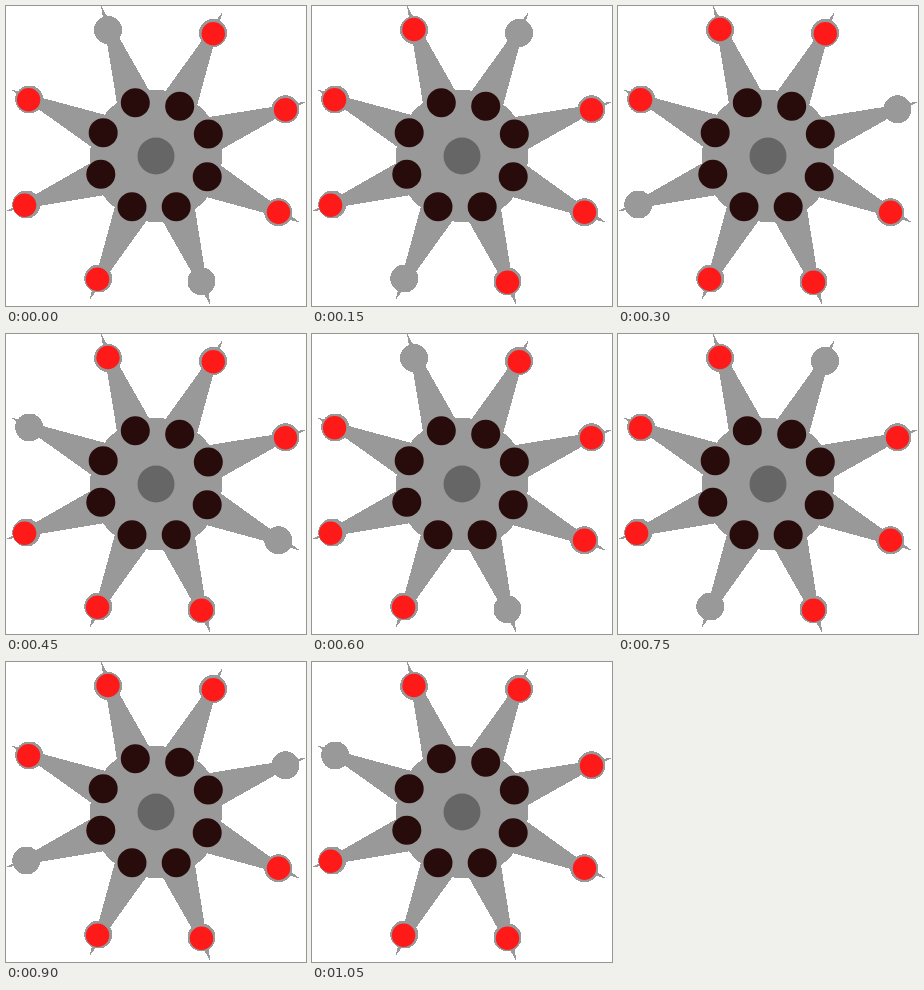
Recreate the animation shown at these times as an HTML page. Size 300 by 300 pixels, loop 1.2 s.

```html
<!DOCTYPE html>
<html lang="en">
<head>
<meta charset="utf-8">
<title>Arm lights</title>
<style>
  html, body { margin: 0; width: 100%; height: 100%; overflow: hidden; background: #fff; }
  svg { display: block; width: 100%; height: 100%; }
</style>
</head>
<body>
<svg id="stage" viewBox="0 0 300 300"></svg>
<script>
const STEP = 150;
const STEPS = 8;
const CENTER = 150;
const TIP_REACH = 1.01;
const GRAY = '#999';

// Clockwise from the upper left: spike tip, end disc, lamp and inner dot.
const arms = [
  { tip: [95.5, 1],  disc: [102, 24],      lamp: [102, 23.5],    dot: [129.3, 96.8] },
  { tip: [216, 7],   disc: [207, 27],      lamp: [207.3, 27.7],  dot: [173.7, 100.3] },
  { tip: [299, 96],  disc: [279.5, 103.3], lamp: [279.5, 103.7], dot: [202.3, 128] },
  { tip: [293, 216], disc: [272.3, 206.3], lamp: [272.5, 206.2], dot: [201.2, 170.8] },
  { tip: [204, 298], disc: [195.5, 275.3], lamp: [195.5, 276.2], dot: [170.2, 200.8] },
  { tip: [84, 293],  disc: [92.3, 272.5],  lamp: [91.6, 273.3],  dot: [126, 200.7] },
  { tip: [1, 205],   disc: [20.3, 198.5],  lamp: [18.6, 199.3],  dot: [94.8, 168.3] },
  { tip: [6, 84],    disc: [23.2, 93.5],   lamp: [22.6, 93.8],   dot: [97.2, 126.8] },
];

const stage = document.getElementById('stage');
const crisp = { 'shape-rendering': 'crispEdges' };

function add(tag, attributes) {
  const node = document.createElementNS('http://www.w3.org/2000/svg', tag);
  for (const [name, value] of Object.entries(attributes)) node.setAttribute(name, value);
  return stage.appendChild(node);
}

function circle([cx, cy], r, fill, extra = {}) {
  return add('circle', { cx, cy, r, fill, ...extra });
}

// Each arm is a triangle whose base leans slightly counterclockwise.
function drawArm({ tip: [x, y], disc }) {
  const dx = x - CENTER, dy = y - CENTER;
  const length = Math.hypot(dx, dy);
  const basePoint = offset => [CENTER - dy / length * offset, CENTER + dx / length * offset];
  const tip = [CENTER + dx * TIP_REACH, CENTER + dy * TIP_REACH];
  const points = [tip, basePoint(26.8), basePoint(-30.6)].join(' ');
  add('polygon', { points, fill: GRAY, ...crisp });
  circle(disc, 14, GRAY, crisp);
}

arms.forEach(drawArm);
circle([CENTER, CENTER], 66, GRAY, crisp);
circle([CENTER, CENTER], 18.5, '#666');
arms.forEach(({ dot }) => circle(dot, 14.5, '#280c0c'));
const lamps = arms.map(({ lamp }) => circle(lamp, 11.7, '#ff1a1a'));

// Opposite lamps go dark in pairs; on the last step only the final lamp does.
function isDark(index, step) {
  return step === STEPS - 1 ? index === step : index % 4 === step % 4;
}

function render(time) {
  const step = Math.floor(time / STEP) % STEPS;
  lamps.forEach((lamp, i) => lamp.setAttribute('visibility', isDark(i, step) ? 'hidden' : 'visible'));
}

const start = performance.now();
function tick() {
  render(performance.now() - start);
  requestAnimationFrame(tick);
}
tick();
</script>
</body>
</html>
```
